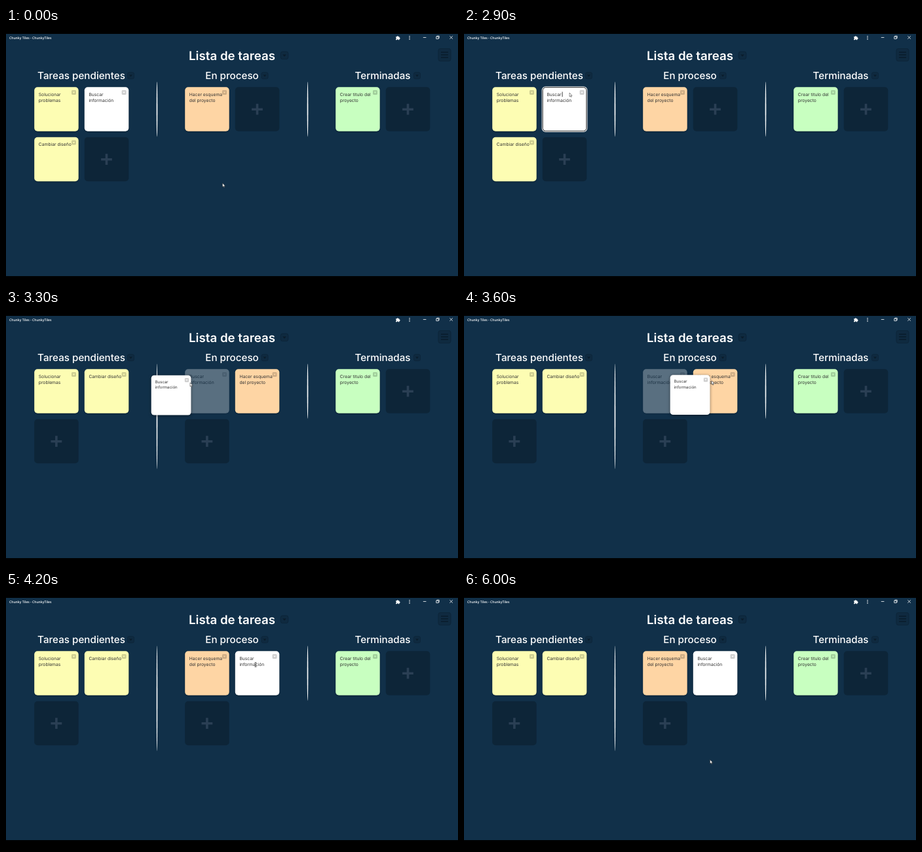
An HTML page for the animation above (6200 ms loop, 690x388 px).

```html
<!DOCTYPE html>
<html lang="es">
<head>
<meta charset="utf-8">
<title>Lista de tareas</title>
<style>
  html, body { margin: 0; width: 100%; height: 100%; overflow: hidden; background: #000; }
  svg { display: block; width: 100%; height: 100%; }
  text { font-family: Inter, "Open Sans", sans-serif; text-rendering: geometricPrecision; }
  .bar { font: 600 5.05px "Open Sans", sans-serif; fill: #fff; }
  .title { font-size: 18.7px; font-weight: 600; fill: #fff; text-anchor: middle; }
  .head { font-size: 15.2px; font-weight: 500; fill: #fff; text-anchor: middle; }
  .note text { font-size: 6.75px; fill: #333; }
  .paper { filter: drop-shadow(0 1px 1.2px rgba(0, 0, 0, .3)); }
  .lifted .paper { filter: drop-shadow(0 1px 2.5px rgba(0, 0, 0, .5)); }
  .line { fill: none; stroke: #fff; stroke-width: .8; }
</style>
</head>
<body>
<svg id="stage" viewBox="0 0 690 388">
  <defs>
    <g id="drop">
      <rect x="-5" y="-5" width="10" height="10" rx="2.5" fill="#0f2a40" stroke="#0d2539" stroke-width=".8"/>
      <path d="M-2.4 -1.2H2.4L0 1.7Z" fill="#0a1c2b"/>
    </g>
    <g id="add">
      <rect width="67.5" height="67.5" rx="5" fill="#0d2538"/>
      <path d="M25.3 33.9H42.1M33.7 25.5V42.3" stroke="#2a3f54" stroke-width="3.6"/>
    </g>
  </defs>

  <rect y="9" width="690" height="370" fill="#113049"/>

  <text class="bar" x="5" y="17.1">Chunky Tiles - ChunkyTiles</text>
  <path fill="#fff" d="M595.2 13.2H596.7A1.2 1.2 0 0 1 599 13.2H600.4V14.6A1.2 1.2 0 0 1 600.4 17V18.2H598.8A1 1 0 0 0 596.8 18.2H595.2V16.6A1 1 0 0 0 595.2 14.7Z"/>
  <g fill="#fff">
    <circle cx="616" cy="12.7" r=".75"/>
    <circle cx="616" cy="15" r=".75"/>
    <circle cx="616" cy="17.3" r=".75"/>
  </g>
  <path class="line" d="M636.8 14.5H641.4M656.8 13.2H660.2V16.6H656.8ZM657.8 13.2V12.2H661.2V15.6H660.2M677.4 12.3L681.8 16.7M681.8 12.3L677.4 16.7"/>

  <text class="title" x="345" y="48.6">Lista de tareas</text>
  <use href="#drop" transform="translate(425 41.8) scale(1.15)"/>
  <rect x="660" y="31.5" width="19" height="19" rx="3" fill="#0f2a40" stroke="#0d2539"/>
  <path d="M664 37H675M664 41H675M664 45H675" stroke="#0a1c2b" stroke-width="1.5"/>

  <text class="head" x="115" y="77.7">Tareas pendientes</text>
  <text class="head" x="345" y="77.7">En proceso</text>
  <text class="head" x="575" y="77.7">Terminadas</text>
  <use href="#drop" x="190.5" y="72.7"/>
  <use href="#drop" x="395" y="72.7"/>
  <use href="#drop" x="627.5" y="72.7"/>

  <ellipse class="divider" cx="230.5" rx=".8" fill="#fff"/>
  <ellipse class="divider" cx="460.5" rx=".8" fill="#fff"/>
  <use class="add" href="#add"/>
  <use class="add" href="#add"/>
  <use class="add" href="#add"/>
  <g id="notes"></g>

  <g id="arrow">
    <path d="M0 0V5.8L1.4 4.6 2.3 6.5 3.2 6.1 2.3 4.3H4.1Z" fill="#fff" stroke="#222" stroke-width=".5"/>
  </g>
  <g id="beam">
    <path d="M-1.5 -3.2H1.5M0 -3.2V3.2M-1.5 3.2H1.5" fill="none" stroke="#222" stroke-width=".7"/>
  </g>
</svg>

<script>
const LOOP = 6200, TICK = 100;
const $ = id => document.getElementById(id);
const all = sel => [...document.querySelectorAll(sel)];
const place = (el, [x, y], scale = 1) =>
  el.setAttribute('transform', `translate(${x} ${y}) scale(${scale})`);
const show = (el, on) => el.setAttribute('visibility', on ? 'visible' : 'hidden');

function addNote(color, lines) {
  const g = document.createElementNS('http://www.w3.org/2000/svg', 'g');
  g.setAttribute('class', 'note');
  g.innerHTML = `
    <rect class="paper" width="67.5" height="67.5" rx="5" fill="${color}"/>
    <rect x="56.8" y="4.7" width="7" height="7" rx="1.4" fill="#000" opacity=".19"/>
    <path d="M58.4 7.1H62.2L60.3 9.5Z" fill="${color}"/>` +
    lines.map((s, i) => `<text x="6.6" y="${13.4 + 9.4 * i}">${s}</text>`).join('');
  $('notes').append(g);
  return g;
}

const search = ['Buscar', 'información'];
const solve = addNote('#fdfdb3', ['Solucionar', 'problemas']);
const design = addNote('#fdfdb3', ['Cambiar diseño']);
const scheme = addNote('#fed5a4', ['Hacer esquema', 'del proyecto']);
const headline = addNote('#c8ffc0', ['Crear titulo del', 'proyecto']);
const info = addNote('#fff', search);
const ghost = addNote('#fff', search);
ghost.classList.add('lifted');

info.insertAdjacentHTML('beforeend', `
  <g id="focus" fill="none">
    <rect x="-.6" y="-.6" width="68.7" height="68.7" rx="5.5" stroke="#fff" stroke-width="1.1"/>
    <rect x=".4" y=".4" width="66.7" height="66.7" rx="4.6" stroke="#151515" stroke-width=".9"/>
  </g>
  <path id="caret" d="M30.3 7.2V14.8" stroke="#111" stroke-width=".8"/>`);

// Board layouts and the time each one begins
const boards = [
  [0, [[solve, info, design], [scheme], [headline]]],
  [3300, [[solve, design], [info, scheme], [headline]]],
  [4000, [[solve, design], [scheme, info], [headline]]]
];
const slot = (col, i) => [43.2 + 230 * col + 76.6 * (i % 2), 90.3 + 76.5 * (i >> 1)];

const ease = {
  in: u => u * u,
  out: u => 1 - (1 - u) ** 2,
  both: u => u * u * (3 - 2 * u)
};

// Waypoints: time, x, y, easing used to arrive
const pointer = [
  [300, 330.5, 237], [900, 149, 95, 'both'], [1000, 155, 97, 'out'],
  [2800, 155, 97], [2900, 161, 99, 'out'], [3300, 281, 111, 'in'],
  [3500, 374, 109, 'out'], [3600, 378, 108, 'out'],
  [4100, 378, 108], [4200, 381, 111, 'out'],
  [4400, 381, 111], [5000, 375.6, 256.3, 'both']
];
const drag = [
  [2900, 112, 94], [3300, 221.7, 99.8, 'in'],
  [3500, 311, 99.2, 'out'], [3600, 314.7, 99.2, 'out']
];

function along(path, t) {
  const i = path.findIndex(p => p[0] > t);
  if (i === 0) return path[0].slice(1, 3);
  if (i < 0) return path[path.length - 1].slice(1, 3);
  const [t0, x0, y0] = path[i - 1], [t1, x1, y1, kind = 'both'] = path[i];
  const u = ease[kind]((t - t0) / (t1 - t0));
  return [x0 + (x1 - x0) * u, y0 + (y1 - y0) * u];
}

const adds = all('.add'), dividers = all('.divider');

function draw(t) {
  const lists = boards.filter(b => b[0] <= t).pop()[1];
  lists.forEach((list, col) => {
    list.forEach((note, i) => place(note, slot(col, i)));
    place(adds[col], slot(col, list.length));
    if (!col) return;
    const rows = (list.length >> 1) + 1;
    const half = (7.6 + 76.6 * rows) / 2;
    dividers[col - 1].setAttribute('cy', 82 + half);
    dividers[col - 1].setAttribute('ry', half);
  });

  const held = t >= 3000 && t < 4100;
  info.setAttribute('opacity', held ? .3 : 1);
  show(ghost, held);
  place(ghost, along(drag, t), .9);
  show($('focus'), t >= 1100 && t < 3000);
  show($('caret'), t >= 1200 && t < 3000);

  const [x, y] = along(pointer, t);
  const typing = (t < 2900 && x < 187 && y < 158) || (t >= 4200 && y < 158);
  place($('arrow'), [x, y]);
  place($('beam'), [x, y]);
  show($('arrow'), !typing);
  show($('beam'), typing);
}

function tick(now) {
  draw(Math.floor(now % LOOP / TICK) * TICK);
  requestAnimationFrame(tick);
}
draw(0);
requestAnimationFrame(tick);
</script>
</body>
</html>
```
